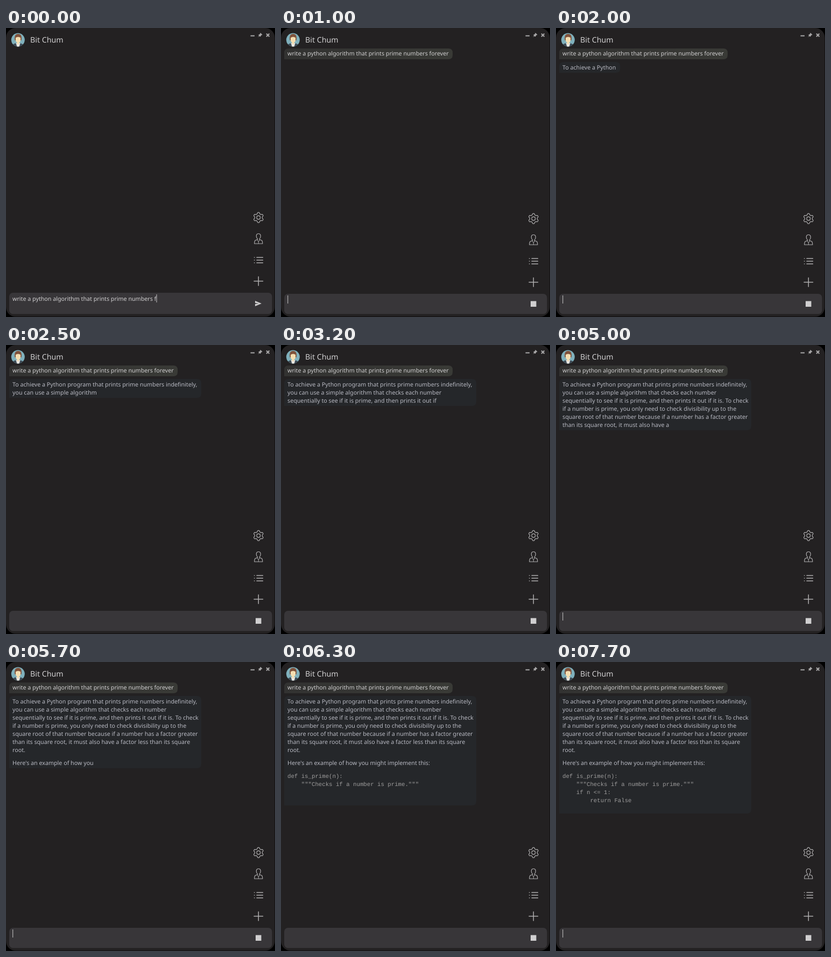
An HTML page for the animation above (8000 ms loop, 500x536 px).

```html
<!DOCTYPE html>
<html lang="en">
<head>
<meta charset="utf-8">
<title>Chat</title>
<style>
  html, body { margin: 0; width: 100%; height: 100%; overflow: hidden; background: #000; }
  svg { display: block; }
  text { font: 10.71px "Noto Sans", sans-serif; fill: #d0cfd0; text-rendering: geometricPrecision; white-space: pre; }
  #title { font-size: 14.2px; }
  #reply text { fill: #b9bac3; }
  #reply .code { font-family: "Liberation Mono", monospace; fill: #9d9c9c; }
  .icon { fill: none; stroke: #b0afb0; stroke-width: 1.2; stroke-linejoin: round; stroke-linecap: round; }
</style>
</head>
<body>
<svg width="500" height="536" viewBox="0 0 500 536">
  <defs>
    <linearGradient id="ask" x2="1"><stop stop-color="#323231"/><stop offset="1" stop-color="#393a36"/></linearGradient>
    <clipPath id="round"><circle cx="22.3" cy="22" r="12.5"/></clipPath>
  </defs>
  <rect width="499.5" height="535.5" rx="18" fill="#232122"/>

  <g clip-path="url(#round)">
    <rect x="9" y="9" width="27" height="27" fill="#7fb0bc"/>
    <path d="M10 36q1-6 7-7.500h10.500q6 1.500 7 7.500z" fill="#3d4b57"/>
    <path d="M18.500 28h8l-2 7h-4z" fill="#e9e6df"/>
    <path d="M16.500 23q-2-12 6-12t6 12z" fill="#80523b"/>
    <path d="M18 18q4.500-3 9 0v5q-.5 3-2.500 4v2q-2 2-4 0v-2q-2-1-2.500-4z" fill="#f5deb1"/>
  </g>
  <text id="title" x="45" y="27">Bit Chum</text>

  <g stroke="#aaa9aa" stroke-width="2" fill="#aaa9aa">
    <path d="M454.500 14.500h7.500M484 10.500l5.500 5.500M489.500 10.500l-5.500 5.500"/>
    <path d="M473 9.500l3 3-2 .5-1.500 3-3-3 3-1.500zM469 16.500l2-2" stroke-width="1"/>
  </g>

  <g id="tools" class="icon">
    <path id="gear"/>
    <circle cx="469.300" cy="351.500" r="3.300"/>
    <path d="M465.300 386q0-4.500 4-4.500t4 4.500q0 3.500-2.200 5v1.300l4 1.500q1.700 1 1.700 6.200h-15q0-5.200 1.700-6.200l4-1.500v-1.300q-2.200-1.500-2.200-5z"/>
    <path d="M466.800 393l2.500 3 2.500-3M469.300 396v3.500" stroke-width="1"/>
    <path d="M466 425.500h11.500M466 430.500h11.500M466 435.500h11.500M461.500 425.500h.4M461.500 430.500h.4M461.500 435.500h.4" stroke-width="1.300"/>
    <path d="M461 469.500h16.500M469.300 461.300v16.500" stroke-width="1.500"/>
  </g>

  <rect id="box" x="6" width="488.500" rx="7" fill="#383639"/>
  <text id="typed" x="12" y="506"></text>
  <rect id="caret" width="1" height="15" fill="#cbcacb"/>
  <path id="send" d="M463 506l12 5-12 5v-4l7-1-7-1z" fill="#d0cfd0"/>
  <rect id="stop" x="464" y="506.500" width="10.500" height="10.500" fill="#d0cfd0"/>

  <g id="prompt">
    <path d="M6 58V46q0-8 8-8h297q8 0 8 8v4q0 8-8 8z" fill="url(#ask)"/>
    <text x="12" y="51"></text>
  </g>
  <g id="reply"><path id="bubble" fill="#25272a"/></g>
</svg>
<script>
const $ = id => document.getElementById(id);
const LOOP = 8000, SENT = 1000, CODE = 8, CODE_CHAR = 6.43;
const question = 'write a python algorithm that prints prime numbers forever';
const answer = `To achieve a Python program that prints prime numbers indefinitely,
you can use a simple algorithm that checks each number
sequentially to see if it is prime, and then prints it out if it is. To check
if a number is prime, you only need to check divisibility up to the
square root of that number because if a number has a factor greater
than its square root, it must also have a factor less than its square
root.
Here's an example of how you might implement this:
def is_prime(n):
    """Checks if a number is prime."""
    if n <= 1:
        return False`.split('\n');

// [time, words shown]: the stream stalls, then catches up
const stream = [[1800, 0], [2500, 16], [3600, 43], [4000, 43], [4100, 52], [5000, 73], [5100, 77],
  [5200, 77], [5300, 81], [5500, 81], [5600, 84], [6300, 96], [6400, 96], [6600, 102], [LOOP, 102]];
const keyTimes = [100, 200, 300, 500, 600, 700];

const lines = answer.map((line, i) => {
  const node = document.createElementNS('http://www.w3.org/2000/svg', 'text');
  const y = 77 + 15 * i + (i >= 7 ? 9 : 0) + (i >= CODE ? 8.5 : 0);
  const indent = line.search(/\S/);
  node.setAttribute('x', 12 + indent * CODE_CHAR);
  node.setAttribute('y', y);
  if (i >= CODE) node.setAttribute('class', 'code');
  $('reply').append(node);
  return { node, y, words: line.trim().split(' ') };
});

function gearPath(cx, cy) {
  let d = '';
  for (let i = 0; i < 120; i++) {
    const a = i / 120 * 2 * Math.PI;
    const r = 8.2 + 1.3 * Math.tanh(1.8 * Math.cos(6 * a));
    d += (i ? 'L' : 'M') + (cx + r * Math.sin(a)).toFixed(2) + ' ' + (cy - r * Math.cos(a)).toFixed(2);
  }
  return d + 'z';
}

function wordsAt(t) {
  const i = stream.findIndex(k => k[0] > t);
  if (i < 1) return i ? stream.at(-1)[1] : 0;
  const [t0, n0] = stream[i - 1], [t1, n1] = stream[i];
  return Math.floor(n0 + (n1 - n0) * (t - t0) / (t1 - t0) + 1e-6);
}

const show = (id, on) => $(id).setAttribute('visibility', on ? 'visible' : 'hidden');

function drawReply(count) {
  show('reply', count > 0);
  let left = count, last = 0, blank = 0;
  lines.forEach(({ node, words }, i) => {
    const n = Math.min(left, words.length);
    node.textContent = words.slice(0, n).join(' ');
    left -= n;
    if (!n) return;
    last = i;
    blank = i < CODE ? 0 : n === words.length && i < lines.length - 1 ? 2 : 1;
  });
  if (!count) return;
  const right = last ? 363 : Math.min(363, 20 + lines[0].node.getComputedTextLength());
  const bottom = Math.ceil(lines[last].y) + 6 + 15 * blank;
  $('bubble').setAttribute('d', `M6 ${bottom}V71q0-8 8-8H${right - 8}q8 0 8 8V${bottom - 8}q0 8-8 8z`);
}

function draw(t) {
  const sent = t >= SENT;
  const shift = sent ? 2 : 0;
  show('prompt', sent);
  show('stop', sent);
  show('send', !sent);
  $('tools').setAttribute('transform', `translate(0 ${shift})`);
  $('box').setAttribute('y', 491 + shift);
  $('box').setAttribute('height', 39.5 - shift);

  const missing = keyTimes.filter(k => k > t).length;
  $('typed').textContent = sent ? '' : question.slice(0, question.length - missing);
  const width = sent ? 0 : $('typed').getComputedTextLength();
  $('caret').setAttribute('x', 12.2 + width);
  $('caret').setAttribute('y', 494 + shift);
  show('caret', t < 1100 || (t + 400) % 1000 < 500);

  drawReply(wordsAt(t));
}

$('gear').setAttribute('d', gearPath(469.3, 351.5));
document.querySelector('#prompt text').textContent = question;

const start = performance.now();
function tick() {
  const t = (performance.now() - start) % LOOP;
  draw(Math.floor(t / 100) * 100);
  requestAnimationFrame(tick);
}
tick();
</script>
</body>
</html>
```
